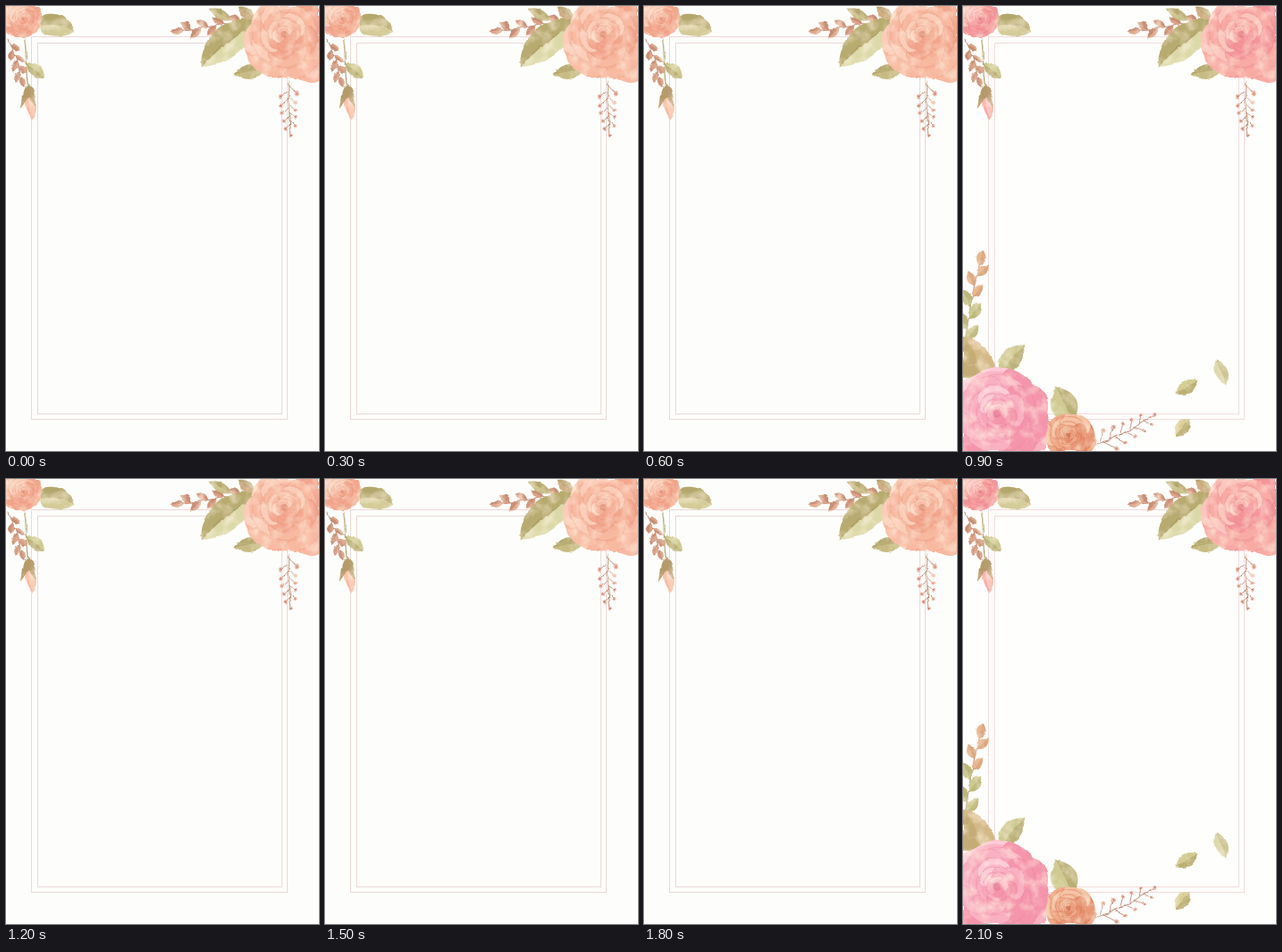
These frames come from a looping animation (350x498 px, 2.4 s). An HTML page:

```html
<!DOCTYPE html>
<html lang="en">
<head>
<meta charset="utf-8">
<title>Floral frame</title>
<style>
html, body { margin: 0; width: 100%; height: 100%; overflow: hidden; background: #fdfefb; }
svg { display: block; width: 350px; height: 498px; background: #fdfefb; --line: #ecd8d7; }
svg.bloom { background: #fefefc; --line: #f4dbdb; }
.peach { --l: #fbcdb8; --b: #f8b9a1; --m: #f3a68d; --d: #dd8a70; }
.bloom .peach { --l: #fbc5bd; --b: #f8aba4; --m: #f4959a; --d: #e2757c; }
.pink { --l: #fccbd6; --b: #f9b0c1; --m: #f595ac; --d: #e67590; }
.orange { --l: #f6c3a4; --b: #efa987; --m: #e7906d; --d: #c96b4c; }
#low { visibility: hidden; }
.bloom #low { visibility: visible; }
</style>
</head>
<body>
<svg id="stage" viewBox="0 0 350 498" xmlns="http://www.w3.org/2000/svg"></svg>
<script>
const stage = document.getElementById('stage');
const PALE = '#dcd9a8', OLIVE = '#c6bb82', MOSS = '#a3955a', RUST = '#dda388', BROWN = '#b47c64';

const fill = (d, color, opacity = 1) =>
  `<path d="${d}" style="fill:${color};opacity:${opacity}"/>`;
const line = (d, color, width = 1, opacity = 1) =>
  `<path d="${d}" style="fill:none;stroke:${color};stroke-width:${width};opacity:${opacity};stroke-linecap:round"/>`;
const group = (attrs, ...parts) => `<g ${attrs}>${parts.join('')}</g>`;
const times = (n, make) => Array.from({ length: n }, (_, i) => make(i)).join('');

function random(seed) {
  return () => (seed = seed * 16807 % 2147483647) / 2147483647;
}

// A pointed leaf from base to tip, one half shaded, with a vein.
function leaf(x1, y1, x2, y2, width, color, dark) {
  const len = Math.hypot(x2 - x1, y2 - y1);
  const nx = (y1 - y2) / len * width, ny = (x2 - x1) / len * width;
  const side = k => `${(x1 + x2) / 2 + nx * k},${(y1 + y2) / 2 + ny * k}`;
  const start = `M${x1},${y1}Q`, tip = ` ${x2},${y2}`;
  return fill(`${start}${side(1)}${tip}Q${side(-1)} ${x1},${y1}`, color) +
    fill(`${start}${side(1)}${tip}Q${side(.1)} ${x1},${y1}`, dark, .5) +
    line(`${start}${side(.1)}${tip}`, dark, .5, .7);
}

// A curved stem with parts set alternately left and right of it.
function sprig([x0, y0, cx, cy, x1, y1], n, spread, part) {
  const mix = (a, b, c, t) => a * (1 - t) ** 2 + 2 * b * t * (1 - t) + c * t * t;
  const stem = line(`M${x0},${y0}Q${cx},${cy} ${x1},${y1}`, BROWN, .9);
  return stem + times(n, i => {
    const t = (i + 1) / n;
    const turn = i === n - 1 ? 0 : i % 2 ? spread : -spread;
    const angle = turn + Math.atan2(
      (cy - y0) * (1 - t) + (y1 - cy) * t, (cx - x0) * (1 - t) + (x1 - cx) * t);
    return part(mix(x0, cx, x1, t), mix(y0, cy, y1, t), angle, t);
  });
}

const leaflet = (len, width, color, dark) => (x, y, a) =>
  leaf(x, y, x + len * Math.cos(a), y + len * Math.sin(a), width, color, dark);

const berry = len => (x, y, a, t) => {
  const reach = len * (1.1 - .5 * t);
  const bx = x + reach * Math.cos(a), by = y + reach * Math.sin(a);
  return line(`M${x},${y}L${bx},${by}`, BROWN, .8) +
    `<circle cx="${bx}" cy="${by}" r="${2.6 - .6 * t}" fill="#edb3a5"/>` +
    `<circle cx="${bx}" cy="${by}" r=".9" fill="${BROWN}"/>`;
};

// Rings of overlapping petals, lighter towards the upper left.
function rose(id, cx, cy, radius, edge, seed) {
  const rnd = random(seed);
  const petal = (a, r) => {
    const tone = Math.cos(a + 2.3) + rnd() * 1.6 - .8;
    const color = tone > .45 ? 'var(--l)' : tone > -.5 ? 'var(--b)' : 'var(--m)';
    const oval = (dist, grow, style) =>
      `<ellipse cx="${r * dist}" rx="${r * .42 * grow}" ry="${r * .6 * grow}" style="${style}"/>`;
    return group(`transform="translate(${cx} ${cy}) rotate(${a * 180 / Math.PI})"`,
      oval(.6, 1, `fill:${color};stroke:var(--d);stroke-width:.8;stroke-opacity:.4`),
      oval(.46, .8, 'fill:var(--m);opacity:.4'));
  };
  const rings = times(6, k => {
    const n = 6 - Math.floor(k / 2), r = radius * .72 ** k, shift = rnd() * 6;
    return times(n, i => petal(shift + (i + rnd() * .5) * 2 * Math.PI / n, r));
  });
  return `<clipPath id="${id}"><path d="${edge}"/></clipPath>` +
    group(`clip-path="url(#${id})"`, fill(edge, 'var(--b)'), rings,
      `<circle cx="${cx}" cy="${cy}" r="${radius * .08}" style="fill:var(--d);opacity:.6"/>`);
}

const topRight = group('class="peach" filter="url(#wash)"',
  sprig([280, 12, 240, 23, 199, 27], 9, .65, leaflet(15, 8, RUST, BROWN)),
  leaf(252, 16, 228, 3, 11, OLIVE, MOSS),
  leaf(279, 16, 260, 1, 12, '#cfae82', MOSS),
  fill('M219,68C216,46 232,22 258,16C268,13 278,15 284,19C274,42 254,66 219,68Z', PALE),
  fill('M219,68C216,46 232,22 258,16C268,13 278,15 284,19C262,28 242,44 219,68Z', '#b8ab70'),
  line('M219,68C236,46 252,34 276,24', '#938651', .8, .6),
  leaf(290, 71, 256, 76, 17, OLIVE, MOSS),
  sprig([317, 84, 315, 112, 318, 137], 11, .8, berry(12)),
  rose('right', 311, 32, 50,
    'M285,0C275,8 277,13 274,20C264,30 264,45 270,56C270,66 282,72 293,79C305,82 315,79 325,81C335,86 345,88 350,84V0Z', 11));

const topLeft = group('class="peach" filter="url(#wash)"',
  line('M20,32C24,50 21,72 25,92', '#a59c65', 1.3),
  sprig([2, 38, 12, 58, 17, 79], 7, .65, leaflet(13, 7, RUST, BROWN)),
  fill('M36,14C46,5 70,6 77,29C66,35 50,36 38,28Z', '#d3cb98'),
  fill('M36,14C46,5 70,6 77,29C62,20 50,20 38,22Z', '#b3a76c'),
  leaf(23, 63, 43, 81, 14, '#cdc990', MOSS),
  fill('M22,102C19,114 25,124 30,128C36,120 37,108 30,100Z', 'var(--b)'),
  fill('M27,104C24,114 27,122 31,127C35,118 35,108 30,102Z', 'var(--l)'),
  fill('M25,88C31,90 31,96 35,112C30,108 28,103 26,102C23,104 20,110 16,115C18,102 18,91 25,88Z', '#b59b6a'),
  rose('left', 19, 14, 22, 'M0,0H36C42,8 40,20 34,28C26,36 8,37 0,32Z', 5));

const low = group('id="low" filter="url(#wash)"',
  sprig([0, 400, 5, 340, 18, 291], 9, .6, (x, y, a, t) => t > .6
    ? leaflet(18, 10, '#e8b68f', '#cf966c')(x, y, a)
    : leaflet(22, 12, '#cbc98f', '#aaa662')(x, y, a)),
  fill('M0,370C14,370 30,384 36,404L28,418L0,416Z', '#d3b987'),
  fill('M0,370C10,378 18,396 20,416L0,416Z', '#c0aa70', .8),
  leaf(40, 411, 68, 379, 23, '#cfca92', MOSS),
  leaf(122, 468, 104, 426, 30, '#cfca92', MOSS),
  sprig([146, 492, 180, 480, 207, 462], 11, .85, berry(15)),
  group('class="pink"', rose('big', 38, 456, 60,
    'M0,419C14,416 22,405 38,404C56,405 68,411 79,424C92,429 97,441 94,455C100,470 97,486 90,498H0Z', 23)),
  group('class="orange"', rose('small', 118, 480, 28,
    'M94,474C96,461 108,455 121,457C136,457 146,467 148,480C150,489 147,495 144,498H98C92,492 91,482 94,474Z', 8)),
  leaf(238, 434, 262, 419, 15, '#d2cb90', MOSS),
  leaf(295, 424, 283, 395, 14, '#dfd9ae', '#bdb27a'),
  leaf(237, 482, 253, 462, 15, '#d6cc92', MOSS));

const rect = (id, x, y, w, h) =>
  `<rect id="${id}" x="${x}" y="${y}" width="${w}" height="${h}" style="fill:none;stroke:var(--line)"/>`;

stage.innerHTML = `<defs>
  <filter id="wash" filterUnits="userSpaceOnUse" x="-10" y="-10" width="370" height="518" color-interpolation-filters="sRGB">
    <feTurbulence type="fractalNoise" baseFrequency=".07" numOctaves="3" seed="4" result="noise"/>
    <feDisplacementMap in="SourceGraphic" in2="noise" scale="4" xChannelSelector="R" yChannelSelector="G"/>
    <feGaussianBlur stdDeviation=".4" result="shape"/>
    <feColorMatrix in="noise" values="0 0 0 0 1  0 0 0 0 .95  0 0 0 0 .88  0 0 1.4 0 -.6" result="pale"/>
    <feComposite in="pale" in2="shape" operator="in" result="mottle"/>
    <feMerge><feMergeNode in="shape"/><feMergeNode in="mottle"/></feMerge>
  </filter></defs>` +
  rect('outer', 28.5, 34.5, 286, 428) + rect('inner', 35.5, 41.5, 273, 415) +
  topRight + topLeft + low;

const inner = document.getElementById('inner');
const LOOP = 2400, CYCLE = 1200, OPEN = 900;
const start = performance.now();

function draw(now) {
  const t = Math.max(0, now - start) % LOOP;
  stage.classList.toggle('bloom', t % CYCLE >= OPEN);
  inner.style.stroke = t < 300 ? '#e6d7e0' : 'var(--line)';
  requestAnimationFrame(draw);
}
draw(start);
</script>
</body>
</html>
```
